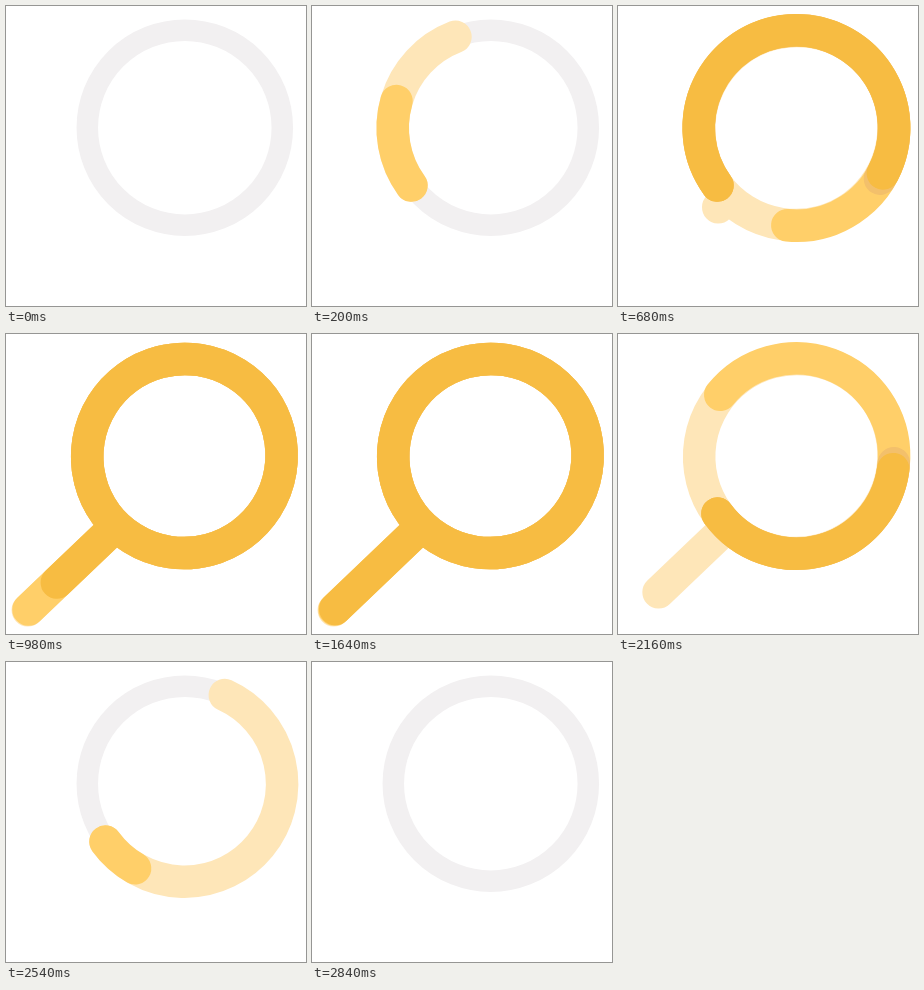
An HTML page that plays this animation: 300 px wide and 300 px high, repeating every 2980 ms.

```html
<!DOCTYPE html>
<html lang="en">
<head>
<meta charset="utf-8">
<title>Magnifier loader</title>
<style>
  html, body { margin: 0; width: 100%; height: 100%; overflow: hidden; background: #fff; }
  svg { display: block; width: 100vw; height: 100vh; }
</style>
</head>
<body>
<svg viewBox="0 0 300 300" fill="none" stroke-linecap="round">
  <circle cx="178.8" cy="121.7" r="97.5" stroke="#f2f0f1" stroke-width="21.5"/>
  <g id="layers" stroke-width="32.5"></g>
</svg>
<script>
const LOOP = 2980, STEP = 20, ERASE_AT = 1620;
const CX = 178.4, CY = 122, R = 97.7, START = 143.9;
const JOINT = [109.5, 192.5], TIP = [21.8, 276.3];
const RING = 2 * Math.PI * R;
const HANDLE = Math.hypot(TIP[0] - JOINT[0], TIP[1] - JOINT[1]);
const TOTAL = RING + HANDLE;

// Keys are [time, distance]. Drawing runs ring then handle; erasing runs from the tip back round the ring.
const layers = [
  { color: '#fee6b8', rest: 0,
    draw: [[10, 0], [400, 368], [540, 490], [750, 695], [860, TOTAL]],
    erase: [[2100, 0], [2160, 26], [2295, HANDLE], [2540, 378], [2838, TOTAL]] },
  { color: '#ffcf69', rest: 1,
    draw: [[105, 0], [400, 276], [860, 695], [970, TOTAL]],
    erase: [[1850, 0], [2055, HANDLE], [2160, 249], [2540, 695], [2577, TOTAL]] },
  { color: '#f7bc42', rest: 2, fringe: '#f3c06b',
    draw: [[215, 0], [400, 155], [980, 695], [1090, TOTAL]],
    erase: [[1620, 0], [1640, 2], [1845, HANDLE], [2160, 503], [2395, TOTAL]] }
];

const group = document.getElementById('layers');
function addPath(color) {
  const path = document.createElementNS('http://www.w3.org/2000/svg', 'path');
  path.setAttribute('stroke', color);
  group.append(path);
  return path;
}
for (const layer of layers) {
  if (layer.fringe) layer.fringePath = addPath(layer.fringe);
  layer.path = addPath(layer.color);
}

function valueAt(keys, t) {
  if (t <= keys[0][0]) return keys[0][1];
  for (let i = 1; i < keys.length; i++) {
    const [t0, v0] = keys[i - 1], [t1, v1] = keys[i];
    if (t < t1) return v0 + (v1 - v0) * (t - t0) / (t1 - t0);
  }
  return keys[keys.length - 1][1];
}

function ringPoint(distance) {
  const a = START * Math.PI / 180 + distance / R;
  return `${(CX + R * Math.cos(a)).toFixed(2)} ${(CY + R * Math.sin(a)).toFixed(2)}`;
}

function arc(from, to) {
  from = Math.max(0, from);
  to = Math.min(RING, to);
  if (to - from < 0.1) return '';
  const turn = `A${R} ${R} 0 0 1 `;
  return `M${ringPoint(from)}${turn}${ringPoint((from + to) / 2)}${turn}${ringPoint(to)}`;
}

function handle(length) {
  if (length <= 0) return '';
  const k = length / HANDLE;
  const [x, y] = JOINT.map((v, i) => v + (TIP[i] - v) * k);
  return `M${JOINT}L${x.toFixed(2)} ${y.toFixed(2)}`;
}

function render(t) {
  const erasing = t >= ERASE_AT;
  for (const { draw, erase, rest, path, fringePath } of layers) {
    const d = valueAt(erasing ? erase : draw, t);
    const from = erasing ? d - HANDLE : 0;
    const to = erasing ? RING : d;
    const stick = erasing ? HANDLE - d : d - RING;
    path.setAttribute('d', arc(from, to) + handle(Math.min(stick, HANDLE - rest)));
    if (fringePath) {
      const lead = d > 0 && d < TOTAL ? 6 : 0;
      fringePath.setAttribute('d', erasing ? arc(from - lead, to) : arc(0, to + lead));
    }
  }
}

const began = performance.now();
function tick() {
  const t = (performance.now() - began) % LOOP;
  render(Math.floor(t / STEP) * STEP);
  requestAnimationFrame(tick);
}
tick();
</script>
</body>
</html>
```
